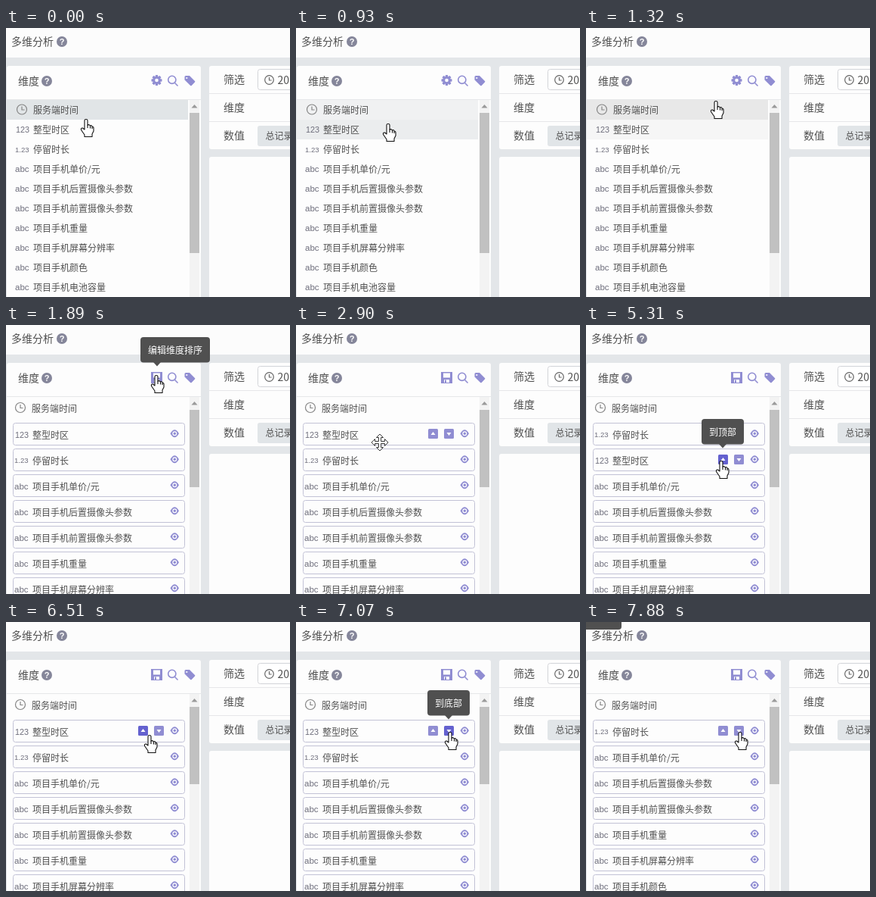
An HTML page for the animation above (8000 ms loop, 376 by 355 pixels).

```html
<!DOCTYPE html>
<html lang="zh-CN">
<head>
<meta charset="utf-8">
<style>
html, body { margin: 0; width: 100%; height: 100%; overflow: hidden; background: #e3e6e9; }
svg { display: block; width: 376px; height: 355px; font-family: "Noto Sans CJK SC", "Noto Sans CJK", sans-serif; }
.mono { font-family: "Liberation Sans", Arial, sans-serif; }
</style>
</head>
<body>
<svg id="stage" viewBox="0 0 376 355"></svg>
<script>
const PURPLE = '#908dd2', DARK = '#6461cf', INK = '#505050', PANEL = '#fdfdfd', LOOP = 8000;
const INT = ['123', '整型时区'], DUR = ['1.23', '停留时长'];
const REST = ['单价/元', '后置摄像头参数', '前置摄像头参数', '重量', '屏幕分辨率', '颜色', '电池容量']
  .map(s => ['abc', '项目手机' + s]);

// Each step changes part of the state; the rest carries over.
// cur: [kind, x, y]; tip: [centre, top, text, opacity, arrow x]; hover: row showing its buttons
const UP = (top, o) => [181, top, '到顶部', o], DOWN = o => [202, 90, '到底部', o];
const GEAR = o => [224, 16, '编辑维度排序', o, 200];
const steps = [
  [0, { cur: ['hand', 106, 120], hi: ['#e1e5e7', PANEL], edit: false, rows: [INT, DUR], hover: -1, lit: -1, tip: null, ghost: null, stray: false }],
  [930, { cur: ['hand', 122, 126], hi: ['#f0f1f2', '#ebedee'] }],
  [1050, { cur: ['hand', 140, 131], hi: [PANEL, '#e4e7e8'] }],
  [1200, { cur: ['hand', 158, 114], hi: ['#eeeeee', '#eeeeee'] }],
  [1320, { cur: ['hand', 172, 96], hi: ['#e8e8e8', '#f6f6f6'] }],
  [1470, { cur: ['hand', 186, 82], hi: ['#f0f0f0', '#f6f6f6'] }],
  [1590, { cur: ['hand', 199, 66] }],
  [1740, { tip: GEAR(1) }],
  [1890, { edit: true }],
  [2400, { cur: ['hand', 179, 93] }],
  [2540, { cur: ['hand', 165, 105], tip: GEAR(.5) }],
  [2660, { cur: ['hand', 148, 122], tip: null }],
  [2780, { cur: ['move', 128, 143], hover: 0 }],
  [2900, { cur: ['move', 111, 155] }],
  [3050, { cur: ['move', 100, 175], hover: 1 }],
  [3200, { cur: ['move', 99, 178] }],
  [3320, { cur: ['move', 99, 181] }],
  [3570, { cur: ['drag', 99, 170], rows: [INT, null], ghost: [9, 154], hover: -1 }],
  [3710, { cur: ['drag', 102, 152], rows: [null, INT], ghost: [12, 136] }],
  [3840, { cur: ['drag', 105, 134], ghost: [15, 118] }],
  [4370, { cur: ['move', 105, 135], rows: [DUR, INT], ghost: null, hover: 0 }],
  [4620, { cur: ['move', 126, 164] }],
  [4760, { cur: ['move', 137, 171], hover: 1 }],
  [4890, { cur: ['move', 148, 176] }],
  [5040, { cur: ['hand', 179, 179], lit: 0 }],
  [5180, { tip: UP(124, .5) }],
  [5310, { tip: UP(124, 1) }],
  [5710, { rows: [INT, DUR], hover: 0, tip: UP(90, 1) }],
  [6140, { cur: ['hand', 180, 174], hover: 1, lit: -1, tip: UP(90, .5) }],
  [6260, { cur: ['hand', 183, 166], tip: null }],
  [6390, { cur: ['hand', 187, 157], hover: 0 }],
  [6510, { cur: ['hand', 190, 149], lit: 0 }],
  [6650, { cur: ['hand', 186, 147], tip: UP(90, 1) }],
  [6800, { cur: ['hand', 201, 145], lit: 1, tip: null }],
  [6950, { cur: ['hand', 203, 145], tip: DOWN(.5) }],
  [7070, { cur: ['hand', 204, 145], tip: DOWN(1) }],
  [7880, { rows: [DUR], lit: -1, tip: null, stray: true }]
];
let last = {};
const scenes = steps.map(([t, change]) => ({ t, s: last = { ...last, ...change } }));

const rect = (x, y, w, h, fill, more = '') => `<rect x="${x}" y="${y}" width="${w}" height="${h}" fill="${fill}" ${more}/>`;
const text = (x, mid, str, size = 12, fill = INK, more = '') =>
  `<text x="${x}" y="${mid + size * .38}" font-size="${size}" fill="${fill}" ${more}>${str}</text>`;
const path = (d, fill, more = '') => `<path d="${d}" fill="${fill}" ${more}/>`;
const group = (x, y, body, more = '') => `<g transform="translate(${x} ${y})" ${more}>${body}</g>`;
const line = (x, y, w) => rect(x, y, w, 1, '#e6e7e9');

const help = (x, y) => `<circle cx="${x}" cy="${y}" r="7" fill="#85869a"/>` +
  text(x, y, '?', 11, '#fff', 'class="mono" font-weight="bold" text-anchor="middle"');
const clock = (x, y, r, color) => group(x, y, `<circle r="${r}"/>` + path(`M0 ${-r * .6}V.5H${r * .55}`, 'none'),
  `fill="none" stroke="${color}" stroke-width="1.2"`);
const kind = (x, mid, k) => text(x + (k === '123'), mid, k, k === '1.23' ? 9.6 : k === '123' ? 10.8 : 11.5, '#6e6e7c', 'class="mono"');

const gear = group(199.5, 69, [0, 45, 90, 135].map(a => rect(-1.7, -7, 3.4, 14, PURPLE, `rx=".7" transform="rotate(${a})"`)).join('') +
  `<circle r="3.7" fill="${PANEL}" stroke="${PURPLE}" stroke-width="2.8"/>`);
const save = group(192, 62, path('M0 0H15V15H0Z', PURPLE) + rect(3, 1.5, 9, 6, PANEL) + rect(4, 10, 7, 4, PANEL) + rect(5, 10.5, 2, 3.5, PURPLE));

function chrome(edit) {
  return rect(0, 0, 376, 355, '#e3e6e9') + rect(0, 0, 376, 39, '#fcfcfc') +
    text(7, 18, '多维分析', 14) + help(74, 18) +
    rect(1, 50, 257, 320, PANEL, 'rx="3"') + text(16, 70, '维度', 14) + help(54, 70) +
    (edit ? save : gear) +
    `<g fill="none" stroke="${PURPLE}" stroke-width="1.6"><circle cx="219.8" cy="68.3" r="5.1"/><path d="M223.5 72.5l4 4"/></g>` +
    path('M236.5 64.5q0-1.5 1.5-1.5h5l7 7q.8.8 0 1.6l-4.3 4.3q-.8.8-1.6 0l-7.6-7.4Z', PURPLE) +
    '<circle cx="239.3" cy="66" r="1.1" fill="#fff"/>' + line(1, 94, 257) +
    rect(269, 50, 120, 110, PANEL, 'rx="3"') + rect(269, 170, 120, 200, PANEL, 'rx="3"') +
    line(269, 86, 107) + line(269, 123, 107) +
    ['筛选', '维度', '数值'].map((s, i) => text(288, 68 + 37 * i, s, 14)).join('') +
    rect(333.5, 54.5, 60, 27, '#fff', 'rx="3" stroke="#d2d4d8"') + clock(348.5, 68.5, 5.8, '#666') + text(359.5, 68.5, '20', 14) +
    rect(333, 129, 60, 27, '#e1e5e8', 'rx="3"') + text(343.5, 142.5, '总记录数');
}

const scrollbar = end => rect(243, 95, 13, 260, '#f3f3f3') +
  path('M245.5 105.5h8l-4-4.5Z', '#9a9a9a') + rect(243, 112, 13, end - 112, '#c1c1c1');

function plainList(hi) {
  return hi.map((c, i) => rect(1, 95 + 26 * i, 240, 26, c)).join('') +
    clock(21, 107.5, 6.5, '#858585') + text(36, 108, '服务端时间') +
    [INT, DUR, ...REST].map(([k, s], i) => kind(12, 134 + 26 * i, k) + text(36, 134 + 26 * i, s)).join('');
}

const button = (x, tri, on) => rect(x, 8, 13, 13, on ? DARK : PURPLE, 'rx="1.5"') + path(tri, '#fff');
const eye = path('M208.5 14.3Q214.3 4.3 220 14.3 214.3 24.3 208.5 14.3Z', PURPLE) +
  `<circle cx="214.3" cy="14.3" r="2.4" fill="${PURPLE}" stroke="#fff" stroke-width="1.2"/>`;

function card([k, s], x, y, hover, lit, more = '') {
  return group(x, y, rect(.5, .5, 227, 29, PANEL, 'rx="3" stroke="#c2c2d6"') +
    kind(2, 15.5, k) + text(26, 16, s) + eye +
    (hover ? button(166, 'M169.5 16h6l-3-4Z', lit === 0) + button(187, 'M190.5 13h6l-3 4Z', lit === 1) : ''), more);
}

function editList(s) {
  return clock(19, 109, 6.5, '#858585') + text(34, 110, '服务端时间') +
    [...s.rows, ...REST].map((r, i) => r ? card(r, 9, 129 + 34 * i, s.hover === i, s.lit) : '').join('') +
    (s.ghost ? card(DUR, ...s.ghost, true, -1, 'opacity=".65"') : '');
}

function tooltip([x, y, str, opacity, arrow = x]) {
  const w = str.length * 12 + 20;
  return `<g opacity="${opacity}">` + rect(x - w / 2, y, w, 33.5, '#505050', 'rx="4"') +
    path(`M${arrow - 5} ${y + 33}h10l-5 5.5Z`, '#505050') +
    text(x, y + 17, str, 12, '#fff', 'text-anchor="middle" font-weight="500"') + '</g>';
}

const OUTLINE = 'stroke="#111" stroke-width="1.1" stroke-linejoin="round"';
const cursors = {
  hand: path('M-2 14V2Q-2 .5 0 .5T2 2V8Q4 6.8 5.5 9 7.5 7.8 8 10 10 10 10 12V16L8 20V23.5H-2V21L-6.5 14.5Q-7 11.5-4.5 12Z', '#fff', OUTLINE) +
    path('M2 8v4M5.5 9v3.5M8 10v3', 'none', OUTLINE),
  move: path('M-1.5-1.5V-6.5H-4.5L0-11 4.5-6.5H1.5V-1.5H6.5V-4.5L11 0 6.5 4.5V1.5H1.5V6.5H4.5L0 11-4.5 6.5H-1.5V1.5H-6.5V4.5L-11 0-6.5-4.5V-1.5Z', '#fff',
    'stroke="#222" stroke-width=".9"'),
  drag: rect(2.5, 17.5, 11, 7, '#fff', 'stroke="#111" stroke-dasharray="2 1"') +
    path('M.5 .5V16L4 12.8 6.5 18.5 9 17.5 6.5 11.8H11.5Z', '#fff', OUTLINE)
};

function draw(s) {
  const [type, x, y] = s.cur;
  stage.innerHTML = chrome(s.edit) + (s.edit ? editList(s) : plainList(s.hi)) + scrollbar(s.edit ? 214 : 297) +
    (s.tip ? tooltip(s.tip) : '') + (s.stray ? rect(-10, -24, 57, 34, '#505050', 'rx="4"') : '') +
    group(x, y, cursors[type]);
}

const stage = document.getElementById('stage');
let shown;
function tick() {
  const t = performance.now() % LOOP;
  const scene = scenes.filter(f => f.t <= t).pop();
  if (scene !== shown) draw((shown = scene).s);
  requestAnimationFrame(tick);
}
tick();
</script>
</body>
</html>
```
